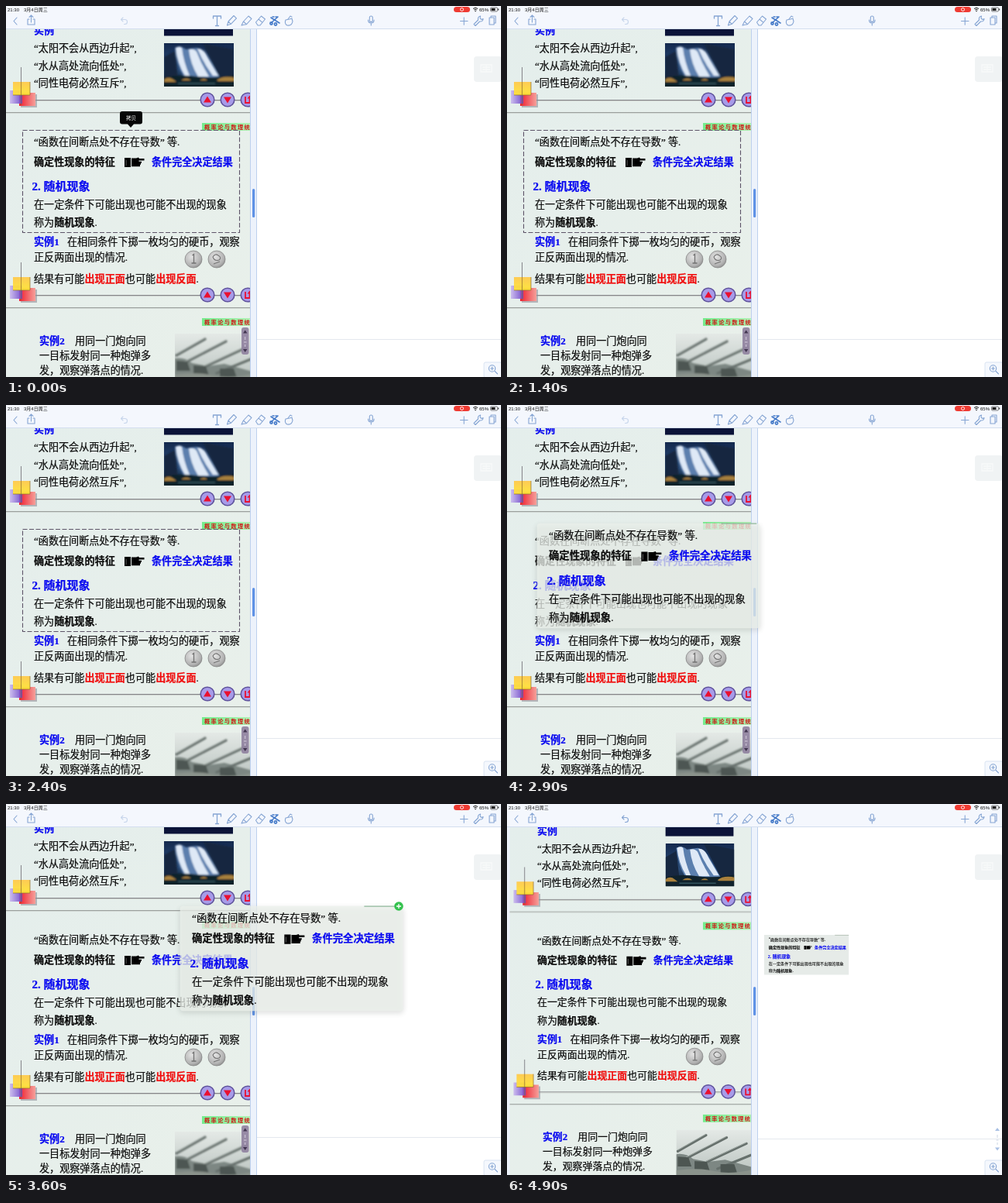
An HTML page for the animation above (5000 ms loop, 639 by 479 pixels).

```html
<!DOCTYPE html>
<html lang="zh-CN">
<head>
<meta charset="utf-8">
<title>拖放笔记</title>
<style>
html, body { margin: 0; width: 100%; height: 100%; overflow: hidden; background: #fff; }
svg { display: block; width: 100vw; height: 100vh; }
text { font-family: "Liberation Serif", "Noto Sans CJK SC", "Noto Sans CJK JP", "Noto Sans CJK", sans-serif; font-size: 13.1px; font-weight: 500; fill: #0c0c0c; stroke: #0c0c0c; stroke-width: .22px; white-space: pre; }
.b { font-weight: 700; }
.blue { fill: #0a0af0; stroke: #0a0af0; font-weight: 700; }
.red { fill: #f01010; stroke: #f01010; font-weight: 700; }
.h { font-size: 15px; }
.ui { font-family: "Liberation Sans", "Noto Sans CJK SC", "Noto Sans CJK JP", sans-serif; font-size: 6px; stroke: none; }
.tag { font-size: 7.2px; font-weight: 700; fill: #d01818; stroke: none; letter-spacing: 1.4px; }
.icon { fill: none; stroke: #86a5d3; stroke-width: 1.1; stroke-linecap: round; stroke-linejoin: round; }
</style>
</head>
<body>
<svg viewBox="0 0 639 479" preserveAspectRatio="none">
<defs>
  <linearGradient id="paper" x1="0" y1="0" x2="1" y2="1">
    <stop offset="0" stop-color="#e4eeec"/><stop offset="1" stop-color="#e9f0ea"/>
  </linearGradient>
  <linearGradient id="yellow" x1="0" y1="0" x2="0" y2="1">
    <stop offset="0" stop-color="#ffc94d"/><stop offset="1" stop-color="#ffe536"/>
  </linearGradient>
  <linearGradient id="violet"><stop offset="0" stop-color="#c9b8ee"/><stop offset="1" stop-color="#6a40c8"/></linearGradient>
  <linearGradient id="crimson"><stop offset="0" stop-color="#ef2030"/><stop offset="1" stop-color="#f5a09a"/></linearGradient>
  <linearGradient id="lime"><stop offset="0" stop-color="#74ec8c"/><stop offset="1" stop-color="#b6f3b8"/></linearGradient>
  <linearGradient id="night" x1="0" y1="0" x2="0" y2="1">
    <stop offset="0" stop-color="#14294e"/><stop offset=".6" stop-color="#2a4c78"/><stop offset="1" stop-color="#0b1620"/>
  </linearGradient>
  <linearGradient id="sky" x1="0" y1="0" x2="0" y2="1">
    <stop offset="0" stop-color="#e4e9e6"/><stop offset="1" stop-color="#b4beba"/>
  </linearGradient>
  <radialGradient id="coin" cx=".4" cy=".35" r=".75">
    <stop offset="0" stop-color="#e4e4e4"/><stop offset=".7" stop-color="#b2b2b2"/><stop offset="1" stop-color="#808080"/>
  </radialGradient>
  <filter id="soft" x="-10%" y="-15%" width="120%" height="135%"><feGaussianBlur stdDeviation="3"/></filter>
  <filter id="haze"><feGaussianBlur stdDeviation=".8"/></filter>
  <clipPath id="pane"><rect x="0" y="30" width="315.5" height="449"/></clipPath>
  <clipPath id="fall"><rect x="204" y="48" width="90" height="56"/></clipPath>
  <clipPath id="guns"><rect x="218" y="423" width="100" height="66"/></clipPath>

  <g id="words">
    <text x="36" y="179.500">“函数在间断点处不存在导数” 等.</text>
    <text x="36" y="205.500" class="b">确定性现象的特征</text>
    <path d="M153 196h8v12h-8zM162 196.5h6l3-1 1 1.5h6.500v2.600h-7v1.200h3.500v2h-1v2h-1v2.500h-11z"/>
    <path d="M155 199v7" stroke="#777" stroke-width=".8"/>
    <text x="188" y="205.500" class="blue">条件完全决定结果</text>
    <text x="33.500" y="238" class="blue h">2. 随机现象</text>
    <text x="36" y="260.500">在一定条件下可能出现也可能不出现的现象</text>
    <text x="36" y="284">称为<tspan class="b">随机现象</tspan>.</text>
  </g>

  <g id="footer">
    <path d="M19.500 79v20M36 121.500h290" stroke="#85858a" stroke-width="1"/>
    <path d="M36 122.500h290" stroke="#c9cec9" stroke-width="1"/>
    <rect x="19" y="114" width="21" height="17" fill="#8f8f98" opacity=".6"/>
    <rect x="17" y="112" width="21" height="17" fill="url(#crimson)"/>
    <rect x="5" y="109" width="16" height="17" fill="url(#violet)" opacity=".9"/>
    <rect x="9" y="98" width="22" height="17" fill="url(#yellow)" opacity=".95"/>
    <path d="M9 115h22v-17M19.500 98v30" fill="none" stroke="#8c6a30" stroke-width=".7"/>
    <g fill="#a79be8" stroke="#5f539c" stroke-width="1.600">
      <circle cx="260" cy="121" r="8.800"/><circle cx="286" cy="121" r="8.800"/><circle cx="312" cy="121" r="8.800"/>
    </g>
    <path d="M255 124.500l5-8 5 8zM281 117.500h10l-5 8zM311.500 119.500l3-4 3 4z" fill="#ea1030"/>
    <path d="M309 117v8h5.500v-6" fill="none" stroke="#ea1030" stroke-width="1.800"/>
  </g>

  <g id="tag">
    <rect x="253" y="151" width="70" height="10" fill="url(#lime)"/>
    <text x="256" y="158.700" class="tag">概率论与数理统计</text>
  </g>
</defs>

<rect width="639" height="479" fill="#fff"/>
<rect y="30" width="324" height="449" fill="#edf2fb"/>

<g clip-path="url(#pane)">
  <g id="doc">
    <rect y="0" width="330" height="500" fill="url(#paper)"/>
    <path d="M0 137.500h330M0 389.500h330" stroke="#9a9f9c"/>
    <path d="M0 138.500h330M0 390.500h330" stroke="#d3dad6"/>

    <text x="36" y="36" class="blue">实例</text>
    <rect x="204" y="20" width="89" height="18.500" fill="#0b1338"/>
    <text x="36" y="59">“太阳不会从西边升起”,</text>
    <text x="36" y="81.500">“水从高处流向低处”,</text>
    <text x="36" y="104">“同性电荷必然互斥”,</text>
    <g clip-path="url(#fall)">
      <rect x="204" y="48" width="90" height="56" fill="url(#night)"/>
      <g filter="url(#haze)">
        <path d="M204 66l14-8 4 34h-18zM254 48l40 8v36h-18z" fill="#162740"/>
        <path d="M218 54q8-4 14 2l14-2q10 2 16 14l14 24h-46q-10-16-12-38z" fill="#5b7fae"/>
        <path d="M219 54q5-3 8 0 2 18 10 36h-6q-10-16-12-36zM236 56q6-2 10 3 6 16 16 32h-14q-10-16-12-35zM247 55q8-1 13 11l14 24h-7q-12-16-20-35z" fill="#dfe9f6"/>
        <path d="M204 92q20-4 42-1t48-2v16h-90z" fill="#10222c"/>
        <path d="M204 95q6-5 12 0l4 3h-16zM226 96q7-5 13 0zM250 96q6-4 10 0zM272 96q9-7 24-3v4h-22z" fill="#a9803c"/>
        <path d="M222 100h48" stroke="#33545e" stroke-width="1.500"/>
      </g>
    </g>
    <use href="#footer"/>
    <use href="#tag"/>
    <use href="#words"/>

    <text x="36" y="309" class="blue">实例1</text>
    <text x="79" y="309">在相同条件下掷一枚均匀的硬币，观察</text>
    <text x="36" y="329">正反两面出现的情况.</text>
    <g stroke="#888" stroke-width=".8">
      <circle cx="242" cy="327" r="11" fill="url(#coin)"/><circle cx="272" cy="327" r="11" fill="url(#coin)"/>
    </g>
    <path d="M240.500 322l2-1.500v11M239.500 332h6" fill="none" stroke="#727272" stroke-width="1.300"/>
    <path d="M267 324q3-5 7-2 5 3 1 6-6 2-8-4zM268 333l8-3" fill="none" stroke="#757575" stroke-width="1.100"/>
    <text x="36" y="356.700">结果有可能<tspan class="red">出现正面</tspan>也可能<tspan class="red">出现反面</tspan>.</text>
    <use href="#footer" y="252"/>
    <use href="#tag" y="252"/>

    <text x="43" y="436.500" class="blue">实例2</text>
    <text x="89" y="436.500">用同一门炮向同</text>
    <text x="43" y="456">一目标发射同一种炮弹多</text>
    <text x="43" y="475">发，观察弹落点的情况.</text>
    <g clip-path="url(#guns)">
      <rect x="218" y="423" width="100" height="66" fill="url(#sky)"/>
      <g filter="url(#haze)">
        <path d="M218 455q12-2 22 6l20 4 22-3 36 10v20h-100z" fill="#7d8783"/>
        <g stroke="#66706c" stroke-width="3.200" stroke-linecap="round">
          <path d="M220 451l37-21M230 461l54-28M252 468l58-27M272 474l44-18"/>
        </g>
        <g stroke="#a3aca8" stroke-width="1"><path d="M220 449.500l37-21M230 459.500l54-28M252 466.500l58-27"/></g>
        <path d="M220 458l14 1 4 12h-18zM242 464l16 1 4 12h-20zM276 468h18l4 12h-22z" fill="#4d5652"/>
        <path d="M218 476q30-4 50 1t50-2v15h-100z" fill="#8b938c"/>
      </g>
    </g>
  </g>
</g>

<g id="leftBar">
  <rect x="304" y="415" width="9.500" height="35" rx="3" fill="#8f819f" opacity=".9"/>
  <path d="M306 422.500l2.700-4 2.700 4zM306 443l2.700 4 2.700-4z" fill="#40344f"/>
  <path d="M308.700 427v4M307 434h3.500M308.700 437v3" stroke="#d4cbdc" stroke-width="1"/>
</g>

<path d="M315.500 30v449M323.500 30v449" stroke="#bdd0ee" stroke-width="1"/>
<rect x="318" y="236" width="3.200" height="37" rx="1.600" fill="#5f92e6"/>

<path id="pageLine" d="M324 430.500h315" stroke="#e4e8ee"/>
<g id="rightBar">
  <path d="M630 422l3-4 3 4zM630 443.500l3 4 3-4z" fill="#a9c0e4"/>
  <path d="M633 427v4M631.500 434h3M633 437v3" stroke="#ccd6e4" stroke-width="1"/>
</g>
<rect x="617" y="460" width="23" height="20" rx="2" fill="#f5f8fd" stroke="#d9e3f2"/>
<path class="icon" d="M631 471.500l3.500 3.500M625.500 468h4M627.500 466v4"/>
<circle class="icon" cx="627.500" cy="468" r="4.200"/>
<rect x="604" y="65" width="36" height="33" rx="4" fill="#f0f3f4"/>
<path d="M613 76h14v9h-14zM615 79h10M615 82h10M620 76v9" fill="none" stroke="#fff" stroke-width="1.300" opacity=".55"/>

<rect width="639" height="30" fill="#f4f7fd"/>
<path d="M0 29.500h639" stroke="#d3deef"/>
<text class="ui" x="2" y="6.500">21:30</text>
<text class="ui" x="23" y="6.500">3月4日周三</text>
<rect x="578" y="1" width="21" height="7" rx="3.500" fill="#ee3a32"/>
<circle cx="588.500" cy="4.500" r="2" fill="none" stroke="#fff" stroke-width=".9"/>
<path d="M603 3.500q3-2.500 6 0M604.300 5q1.700-1.400 3.400 0" fill="none" stroke="#222" stroke-width="1"/>
<circle cx="606" cy="6.500" r=".8" fill="#222"/>
<text class="ui" x="611" y="6.500">65%</text>
<rect x="625.500" y="2" width="9" height="5" rx="1.200" fill="none" stroke="#444" stroke-width=".7"/>
<path d="M626.500 3h5v3h-5zM635.200 3.500h1v2h-1z" fill="#222"/>

<g class="icon">
  <path d="M14 15l-4 4.500 4 4.500"/>
  <path d="M30 17h-2v7h9v-7h-2M32.500 21v-9M30 14.300l2.500-2.500 2.500 2.500"/>
  <path id="undo" d="M151 15l-2.500 2.500 2.500 2.500M148.500 17.500h5q3 0 3 3t-3 3h-1"/>
  <path d="M267.500 16v-3h10v3M272.500 13v12.500M270.500 25.500h4" stroke-width="1.300"/>
  <path d="M285.500 25l1.500-5 7-7.500 3.500 3.300-7.200 7.500zM287 20l3.300 3.300"/>
  <path d="M304 25l2.500-5 6.500-7 4 3.500-6.500 7.200-3.500.5zM306.500 20l4 3.700"/>
  <path d="M322.500 21l7-8 5 4-6.500 8h-3zM326 17l5 4.300"/>
  <g stroke="#4379c8" stroke-width="1.600">
    <path d="M342 15l11 7M342 22l9-8"/><circle cx="342.500" cy="22.500" r="1.600"/><circle cx="348" cy="23.500" r="1.600"/>
    <path d="M344 14h8" stroke-dasharray="2 2"/>
  </g>
  <path d="M361 18q-2 5 2 7 6 1 7-5l-1-4-3 1zM364 17l3-4 2 1"/>
  <rect x="469.300" y="13" width="4" height="7.500" rx="2"/>
  <path d="M467.500 18q0 4 3.800 4t3.800-4M471.300 22v3"/>
  <path d="M586.500 19.500h9.500M591.200 14.800v9.500"/>
  <path d="M604 23.500l5.500-5.500q-1-4 3-5l-.5 3 2 1.500 2-1q-.5 4-4.500 3.500l-5.500 5.500z"/>
  <path d="M624 15h6v9h-6zM626 15v-2h6v9h-2"/>
</g>

<rect id="marquee" x="21.500" y="160.500" width="280" height="132" fill="none" stroke="#5d5468" stroke-width="1.100" stroke-dasharray="6 2.500"/>

<g id="tip">
  <path d="M150 136h23q3 0 3 3v10.500q0 3-3 3h-8l-4 4.500-4-4.500h-7q-3 0-3-3V139q0-3 3-3z" fill="#060606"/>
  <text class="ui" x="155" y="147" style="fill:#fff;font-size:6.500px">拷贝</text>
</g>

<g id="thumb">
  <g id="card">
    <rect x="21" y="160" width="280" height="132" fill="#e6ebe8"/>
    <path d="M255 161h46" stroke="#a9b8ac" stroke-width="2"/>
  </g>
  <use href="#words"/>
</g>

<g id="drag">
  <rect x="20" y="162" width="284" height="134" rx="5" fill="#46504a" opacity=".16" filter="url(#soft)"/>
  <rect x="21" y="160" width="282" height="133" rx="4" fill="#ecf2ed" opacity=".74"/>
  <path d="M254 160.500h45" stroke="#8fb79b" stroke-width="1.300"/>
  <use href="#words"/>
</g>
<g id="plus">
  <circle cx="507" cy="132" r="5.800" fill="#35c24f"/>
  <path d="M504 132h6M507 129v6" stroke="#fff" stroke-width="1.300"/>
</g>
</svg>
<script>
const LOOP = 5000, DROP = 3900, SETTLED = 4100;
const el = id => document.getElementById(id);
const show = (id, on) => el(id).style.display = on ? "" : "none";

// time, left, top, scale, opacity of the lifted block
const path = [
  [2500, 21, 160, 1, 0],
  [2700, 19, 158.5, 1.02, 1],
  [2800, 26, 156, 1.02, 1],
  [2900, 38.7, 152.7, 1.02, 1],
  [3000, 78, 146, 1.02, 1],
  [3200, 188, 134, 1.02, 1],
  [3300, 224.7, 131.7, 1.02, 1],
  [3800, 224.7, 131.7, 1.02, 1],
  [3900, 260, 144, .787, .66]
];

function poseAt(t) {
  const i = path.findIndex(k => k[0] > t);
  if (i < 0) return path[path.length - 1].slice(1);
  if (i === 0) return path[0].slice(1);
  const a = path[i - 1], b = path[i], p = (t - a[0]) / (b[0] - a[0]);
  return a.slice(1).map((v, n) => v + (b[n + 1] - v) * p);
}

function place(id, [x, y, s, alpha]) {
  el(id).setAttribute("transform", `translate(${x} ${y}) scale(${s}) translate(-21 -160)`);
  el(id).setAttribute("opacity", alpha);
}

function draw(ms) {
  const t = Math.floor(ms / 100) * 100;
  const dropped = t >= DROP, settled = t >= SETTLED;
  show("tip", t < 700);
  show("marquee", t < 2600);
  show("drag", t > 2500 && !settled);
  show("plus", t >= 3200 && !dropped);
  show("thumb", dropped);
  show("card", settled);
  show("leftBar", !dropped);
  show("rightBar", dropped);

  const pose = poseAt(t);
  place("drag", pose);
  el("plus").setAttribute("transform", `translate(${pose[0] - 224.7} ${pose[1] - 131.7})`);
  place("thumb", [332, 169, .39, 1]);

  el("doc").setAttribute("transform", dropped ? "translate(3.5 3.6) scale(.986)" : "");
  el("pageLine").setAttribute("transform", `translate(0 ${dropped ? 2 : 0})`);
  el("undo").setAttribute("opacity", dropped ? 1 : .4);
}

const start = performance.now();
function tick(now) {
  draw(Math.max(0, now - start) % LOOP);
  requestAnimationFrame(tick);
}
draw(0);
requestAnimationFrame(tick);
</script>
</body>
</html>
```
